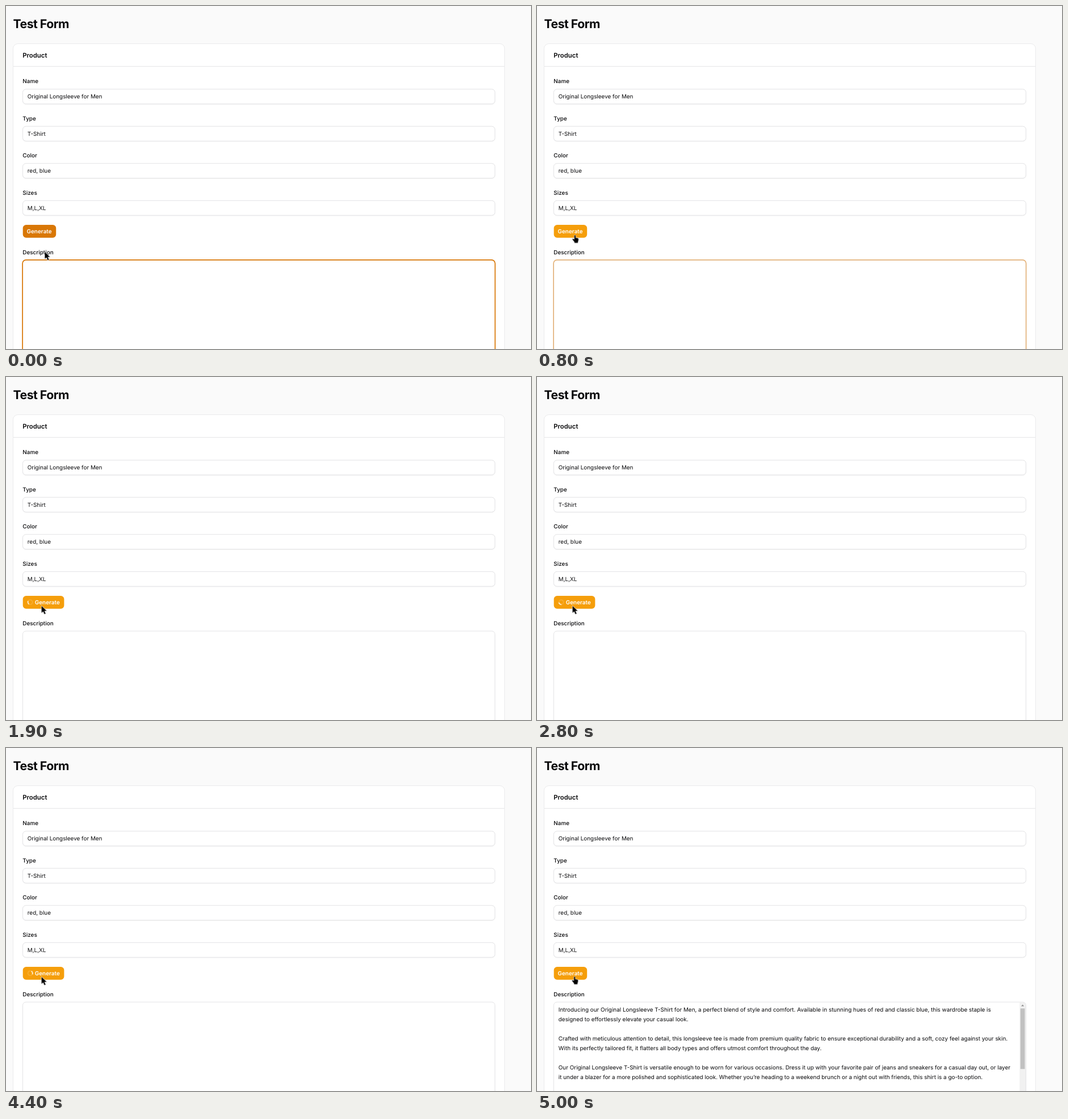
Recreate the animation shown at these times as an HTML page. Size 925 by 605 pixels, loop 7300 ms.

```html
<!DOCTYPE html>
<html lang="en">
<head>
<meta charset="utf-8">
<title>Test Form</title>
<style>
  html, body { margin: 0; width: 100%; height: 100%; overflow: hidden; background: #fafafa; }
  svg { display: block; width: 925px; height: 605px; }
  text {
    font: 400 9.92px Inter, sans-serif;
    font-optical-sizing: none;
    text-rendering: geometricPrecision;
    fill: #09090b;
  }
  .title { font-size: 21.3px; font-weight: 700; letter-spacing: -.025em; }
  .heading { font-size: 11.35px; font-weight: 600; }
  .label { font-weight: 500; }
  .caption { font-weight: 600; fill: #fff; }
  .box { fill: #fff; stroke: #e3e3e5; stroke-width: 1; }
  .shade { fill: none; stroke: #09090b; stroke-opacity: .05; stroke-width: 1; }

  /* one shared 7.3 s clock, hard cuts */
  .anim { animation: 7300ms step-end infinite; }
  .button { animation-name: button; }
  .caption { animation-name: caption; }
  .spinner { animation-name: spinner; }
  .ring { animation-name: ring; }
  .caret { animation-name: caret; }
  .result { animation-name: result; }
  .arrow { animation-name: arrow; }
  .hand { animation-name: hand; }

  @keyframes button {
    0% { fill: #d97706; width: 58.5px; }
    6.849% { fill: #f59e0b; width: 58.5px; }
    15.068% { fill: #f59e0b; width: 72.7px; }
    68.493%, 100% { fill: #f59e0b; width: 58.5px; }
  }
  @keyframes caption {
    0% { transform: none; }
    15.068% { transform: translateX(14.24px); }
    68.493%, 100% { transform: none; }
  }
  @keyframes spinner {
    0% { opacity: 0; transform: rotate(10deg); }
    15.068% { opacity: 1; transform: rotate(10deg); animation-timing-function: steps(39); }
    68.492% { opacity: 1; transform: rotate(1414deg); }
    68.493%, 100% { opacity: 0; transform: rotate(1414deg); }
  }
  @keyframes ring {
    0% { opacity: 1; }
    10.958% { opacity: .5; }
    12.328%, 100% { opacity: 0; }
  }
  @keyframes caret {
    0% { opacity: 0; }
    4.109% { opacity: 1; }
    10.958%, 100% { opacity: 0; }
  }
  @keyframes result {
    0% { opacity: 0; }
    68.493%, 100% { opacity: 1; }
  }
  @keyframes arrow {
    0% { opacity: 1; transform: translate(68.4px, 433.8px); }
    2.739% { opacity: 1; transform: translate(67.6px, 424px); }
    4.109% { opacity: 1; transform: translate(66.4px, 412px); }
    5.479% { opacity: 0; transform: translate(62.6px, 403.8px); }
    12.328% { opacity: 1; transform: translate(62.6px, 403.8px); }
    68.493%, 100% { opacity: 0; transform: translate(62.6px, 403.8px); }
  }
  @keyframes hand {
    0% { opacity: 0; transform: translate(62.2px, 404.3px); }
    5.479% { opacity: 1; transform: translate(62.2px, 404.3px); }
    12.328% { opacity: 0; transform: translate(61.5px, 403.2px); }
    68.493%, 100% { opacity: 1; transform: translate(61.5px, 403.2px); }
  }
</style>
</head>
<body>
<svg viewBox="0 0 925 605">
  <defs>
    <g id="field">
      <rect class="shade" x="29.5" y="147.3" width="832" height="26.2" rx="5.7"/>
      <rect class="box" x="29.5" y="146.7" width="832" height="26" rx="5.7"/>
    </g>
  </defs>

  <rect width="925" height="605" fill="#fafafa"/>
  <text class="title" x="12.5" y="38.5">Test Form</text>

  <rect x="12.5" y="66.5" width="866" height="600" rx="8.5" fill="#fff" stroke="#ebebec"/>
  <path d="M13 106.5H878" stroke="#e6e6e8"/>
  <text class="heading" x="29.3" y="90.5">Product</text>

  <g>
    <text class="label" x="29.3" y="136.1">Name</text>
    <use href="#field"/>
    <text x="37.8" y="163.2">Original Longsleeve for Men</text>
  </g>
  <g transform="translate(0 65.5)">
    <text class="label" x="29.3" y="136.1">Type</text>
    <use href="#field"/>
    <text x="37.8" y="163.2">T-Shirt</text>
  </g>
  <g transform="translate(0 131)">
    <text class="label" x="29.3" y="136.1">Color</text>
    <use href="#field"/>
    <text x="37.8" y="163.2">red, blue</text>
  </g>
  <g transform="translate(0 196.5)">
    <text class="label" x="29.3" y="136.1">Sizes</text>
    <use href="#field"/>
    <text x="37.8" y="163.2">M,L,XL</text>
  </g>

  <rect class="anim button" x="29.7" y="386" width="58.5" height="22.7" rx="5.7" fill="#d97706"/>
  <text class="anim caption" x="36.6" y="400.9">Generate</text>
  <g transform="translate(42.7 397.2) scale(.4746)">
    <g class="anim spinner">
      <circle r="8.5" fill="none" stroke="#fff" stroke-opacity=".2" stroke-width="3"/>
      <path d="M-8.5 0A8.5 8.5 0 0 1 0 -8.5" fill="none" stroke="#fff" stroke-width="3"/>
    </g>
  </g>

  <text class="label" x="29.3" y="437.8">Description</text>
  <rect class="box" x="29.5" y="448.1" width="832" height="200" rx="5.7"/>
  <rect class="anim ring" x="29.1" y="447.8" width="832.6" height="200" rx="6.2" fill="none" stroke="#d97706" stroke-width="1.7"/>
  <path class="anim caret" d="M38.8 456V467.6" stroke="#09090b" stroke-width=".9"/>

  <g class="anim result">
    <path d="M850.3 448.6H856Q861 448.6 861 453.6V605H850.3Z" fill="#f1f1f1"/>
    <path d="M853 455.6L855.6 452.6L858.2 455.6Z" fill="#8f8f8f"/>
    <rect x="851.7" y="459.4" width="7.8" height="106.8" fill="#c1c1c1"/>
    <text x="37.8" y="464.8">Introducing our Original Longsleeve T-Shirt for Men, a perfect blend of style and comfort. Available in stunning hues of red and classic blue, this wardrobe staple is</text>
    <text x="37.8" y="481.9">designed to effortlessly elevate your casual look.</text>
    <text x="37.8" y="516">Crafted with meticulous attention to detail, this longsleeve tee is made from premium quality fabric to ensure exceptional durability and a soft, cozy feel against your skin.</text>
    <text x="37.8" y="533.1">With its perfectly tailored fit, it flatters all body types and offers utmost comfort throughout the day.</text>
    <text x="37.8" y="567.2">Our Original Longsleeve T-Shirt is versatile enough to be worn for various occasions. Dress it up with your favorite pair of jeans and sneakers for a casual day out, or layer</text>
    <text x="37.8" y="584.3">it under a blazer for a more polished and sophisticated look. Whether you’re heading to a weekend brunch or a night out with friends, this shirt is a go-to option.</text>
  </g>

  <g stroke="#fff" stroke-width="1.2" stroke-linejoin="round" paint-order="stroke">
    <path class="anim arrow" d="M0 0V12.2L2.8 9.6L5 14.4L7.2 13.4L5 8.8H9Z"/>
    <path class="anim hand" d="M3.6 1.2Q3.6 0 4.7 0T5.8 1.2V4.6L9.6 5.3Q11 5.7 10.9 7L10.4 10.2Q10.2 11.2 9.8 11.6V13.6H3.8V11.9L.3 7.6Q-.2 6.5 1 6.3L3.6 7.6Z"/>
  </g>
</svg>
</body>
</html>
```
